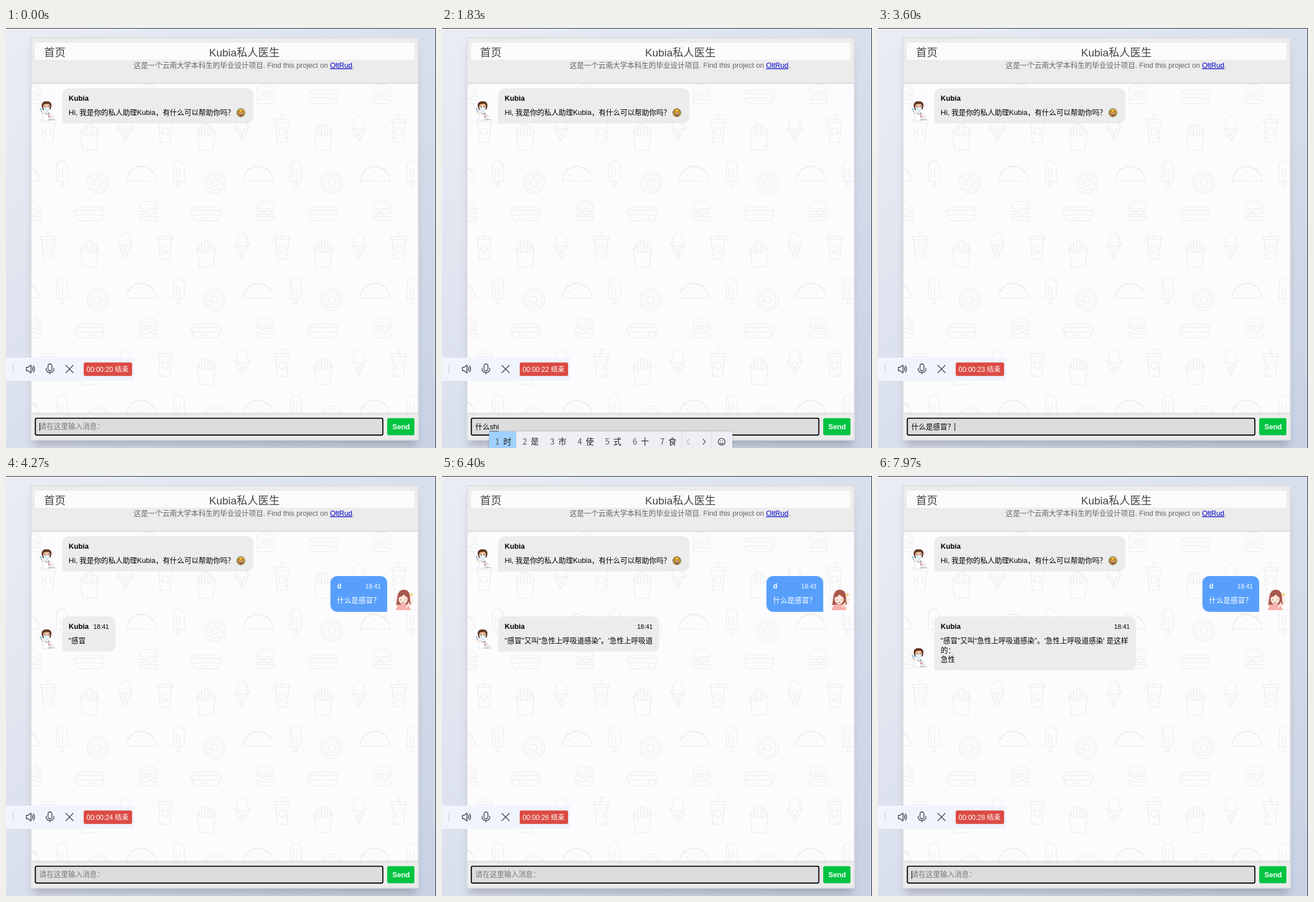
These frames come from a looping animation (758 px wide and 739 px high, 8 s). An HTML page:

```html
<!DOCTYPE html>
<html lang="zh-CN">
<head>
<meta charset="utf-8">
<title>Chat</title>
<style>
html, body { margin: 0; width: 100%; height: 100%; overflow: hidden; }
body { font: 12.7px/16.5px "Liberation Sans", "Noto Sans CJK SC", "Noto Sans CJK", sans-serif; color: #000; }
#stage { position: absolute; left: 0; top: 0; width: 758px; height: 739px; overflow: hidden;
  background: linear-gradient(135deg, #eaedf5, #c8d2e4); }
#stage > * { position: absolute; }
.panel { left: 43px; top: 16px; width: 685px; height: 710px; box-sizing: border-box; border: 2px solid #dcdde0;
  border-radius: 4px; background: #fcfcfe; box-shadow: 0 14px 14px -5px rgba(0, 0, 0, .2); }
.art { left: 0; top: 0; }
.bubble { box-sizing: border-box; padding: 10px 11.5px 10.5px; border-radius: 12px 12px 12px 0; background: #ececec; }
.bubble.me { border-radius: 12px 12px 0 12px; background: #579ffb; color: #fff; }
.head { display: flex; justify-content: space-between; align-items: baseline; height: 16.5px; margin-bottom: 8.5px; }
.head b + span { font-size: 11px; margin-left: 8.2px; }
.msg { max-width: 333.4px; white-space: pre-wrap; }
.msg svg { vertical-align: -4px; margin-left: -1px; }
#input { left: 58.8px; top: 694.4px; white-space: pre; }
#hint { left: 58.8px; top: 693.4px; color: #777; }
#comp { border-bottom: 1px solid #666; }
#caret { display: inline-block; width: 1px; height: 14px; margin-right: -1px; vertical-align: -2.5px; background: #000; }
#ime { top: 710px; height: 34px; display: flex; background: #eeeff5; box-shadow: 0 0 4px rgba(0, 0, 0, .22);
  font: 14.3px/34px "Noto Sans CJK SC", "Noto Sans CJK", sans-serif; color: #222; white-space: nowrap; }
#ime span { padding: 0 9.2px 0 25px; position: relative; }
#ime span:first-child { background: #9fd0ff; }
#ime i { position: absolute; left: 10.5px; font-style: normal; color: #555; }
#ime svg { flex: none; }
</style>
</head>
<body>
<div id="stage">
  <div class="panel"></div>
  <svg class="art" width="758" height="739" fill="none">
    <defs>
      <g id="food" stroke="#ebebef" stroke-width="1.2" stroke-linejoin="round" stroke-linecap="round">
        <path d="M61 367h27v5h-27zM63 372l3 35h17l3-35M74 366v-7h8"/><circle cx="74.5" cy="388" r="6"/>
        <path d="M131 388l4 33h24l4-33q-4 7-16 7t-16-7zM134 390v-8h5v12M139 384v-7h5v17M144 379v-4h6v20M150 378h5v16M155 382h5v9"/>
        <path d="M199 383l11 22 11-22M197 383v-4h4q-2-18 9-18t9 18h4v4zM204 383l9 15M216 383l-9 15"/>
        <path d="M89 476v-24q0-12 9-12t11 12q-3 4 0 8v14q0 2-20 2zM96 476v9h5v-9M94 470v-16M100 470v-16"/>
        <circle cx="162" cy="478" r="19"/><circle cx="162" cy="478" r="6"/>
        <circle cx="162" cy="478" r="14.5" stroke-dasharray="7 3"/><circle cx="162" cy="478" r="10" stroke-dasharray="2 7"/>
        <path d="M212 473q3-20 26-24 23 4 27 24 0 3-3 2h-47q-3 1-3-2zM215 465q4-5 6-11 6 1 9-5 7 2 11-1 6 5 10 4 6 5 9 7M224 466h4M236 460h3M246 467h4M233 470h3"/>
        <path d="M236 318q0-13 15-13t16 13zM235 322h33M235 327q4 4 8 0t8 0 8 0 8 0M236 332h31v3q0 4-4 4h-23q-4 0-4-4zM244 312h2M252 310h2M259 314h2"/>
        <path d="M123 321q1-6 8-6h33q7 0 8 6M123 329q0 10 9 10h30q9 0 9-10M136 334l3-2M146 336l3-2M156 334l3-2"/>
        <rect x="120" y="321" width="54" height="8" rx="4"/>
      </g>
      <g id="nurse">
        <path d="M9 36q-1-14 6-16 9 0 8 16z" fill="#fff" stroke="#d3d7de" stroke-width=".8"/>
        <path d="M9 24l-4-7" stroke="#f3cdb4" stroke-width="2.500"/>
        <path d="M22 25l4 6-6 2" stroke="#e6e8ee" stroke-width="3"/>
        <path d="M4 14l3 5" stroke="#7fc3e8" stroke-width="2.200"/>
        <path d="M7 11q-1-9 8-9t9 8l-1 6-14 1z" fill="#573322"/>
        <ellipse cx="15.500" cy="12" rx="6" ry="7" fill="#f5c4a4"/>
        <path d="M9 8q2-7 8-6 6 0 7 6-7-3-15 0z" fill="#64391f"/>
        <path d="M10 13h11l-2 6q-3.500 1.500-7 0z" fill="#e4f1f8" stroke="#b9d9e8" stroke-width=".6"/>
        <path d="M12 11h1.500M18 11h1.500" stroke="#332" stroke-width="1.4"/>
        <path d="M13 22q3 6 6 0l1 5" stroke="#55606e" stroke-width=".9"/>
        <circle cx="20" cy="29" r="1.500" fill="#d0605a"/><path d="M18 34.500h12" stroke="#999" stroke-width=".9"/>
      </g>
    </defs>
    <path d="M0 .5H757.500V739" stroke="#20222a"/>
    <svg id="wall" x="45" y="98" width="681" height="580" viewBox="45 98 681 580"></svg>
    <path d="M45 18h681v79H45zM45 678h681v46H45z" fill="#ececec"/>
    <path d="M45 97.200h681M45 678.300h681" stroke="#dcdcdd" stroke-width="1.9"/>
    <path d="M51 26h669v30H51z" fill="#fbfbfc"/>
    <g font-size="19" fill="#444"><text x="67" y="50">首页</text><text x="358" y="50">Kubia私人医生</text></g>
    <text x="225" y="70" fill="#666">这是一个云南大学本科生的毕业设计项目. Find this project on <tspan fill="#0000c8" text-decoration="underline">OltRud</tspan>.</text>
    <rect x="51.700" y="686.600" width="612.600" height="29.600" rx="2.500" fill="#ddd" stroke="#000" stroke-width="1.9"/>
    <rect x="672" y="686.500" width="48" height="30" rx="3" fill="#00c441"/>
    <text x="681" y="705.700" fill="#fff" font-weight="bold">Send</text>
    <use href="#nurse" x="56" y="127"/>
    <g id="girl">
      <circle cx="701" cy="219" r="17.500" fill="#fdf0ee"/>
      <path d="M688 227q1-8 2-15 2-12 11-12 10 0 11 12 0 8 2 14z" fill="#a9584c"/>
      <path d="M687 236q1-10 13-11 12 1 13 11z" fill="#f7b0ab"/>
      <ellipse cx="700" cy="217" rx="8" ry="8.500" fill="#ffe6da"/>
      <path d="M691 214q1-10 10-11 8 1 9 11-6-1-9-6-3 5-10 6z" fill="#a9584c"/>
      <path d="M696 217v2M704 217v2M698 222q2 1 4 0" stroke="#7b463d"/>
      <path d="M706 231l5-8" stroke="#ffe3d5" stroke-width="3"/>
      <path d="M715 205l1 3 3 1-3 1-1 3-1-3-3-1 3-1z" fill="#f8cf55"/>
    </g>
    <use id="nurse2" href="#nurse" x="56"/>
  </svg>

  <div class="bubble" style="left:99px;top:106px;width:337px;height:62px">
    <div class="head"><b>Kubia</b></div>
    <div class="msg" style="white-space:nowrap">Hi, 我是你的私人助理Kubia，有什么可以帮助你吗？
      <svg width="16" height="16" viewBox="0 0 16 16" fill="none"><circle cx="8" cy="8" r="7" fill="#f8bd3a" stroke="#43351c"/><path d="M3.500 8.500h9q-.5 4.500-4.500 4.500t-4.500-4.500z" fill="#a3322f" stroke="#43351c" stroke-width=".8"/><path d="M4.300 9h7.400l-.6 1.500h-6.200z" fill="#fff"/><path d="M3.500 6.500q1.500-3 3 0M9.500 6.500q1.500-3 3 0" stroke="#43351c" stroke-width="1.200"/></svg></div>
  </div>
  <div class="bubble me" id="ask" style="left:572px;top:176px;width:100.400px;height:62.500px">
    <div class="head"><b>d</b><span>18:41</span></div>
    <div class="msg" style="white-space:nowrap">什么是感冒？</div>
  </div>
  <div class="bubble" id="reply" style="left:99px;top:247px">
    <div class="head"><b>Kubia</b><span>18:41</span></div>
    <div class="msg" id="answer"></div>
  </div>

  <svg class="art" width="230" height="739" fill="none" stroke="#3d3f46" stroke-width="1.4" stroke-linejoin="round" stroke-linecap="round">
    <path d="M0 580h226v41H0z" fill="#f0f4fd" stroke="none"/>
    <path d="M12.500 592v16" stroke="#c5c9d2" stroke-width="1"/>
    <path d="M36 597h3l5-4v14l-5-4h-3zM46.500 597q2 3 0 6M48.500 594.500q4 5.500 0 11"/>
    <rect x="74" y="591" width="7" height="12" rx="3.500"/><path d="M70.500 599q0 7 7 7t7-7M77.500 606v2.500"/>
    <path d="M105.500 593.500l13 13M118.500 593.500l-13 13"/>
    <rect x="137" y="588.500" width="85.300" height="23.700" rx="3" fill="#db4b44" stroke="none"/>
    <text id="clock" x="142" y="605" font-size="12" fill="#fff" stroke="none"></text>
  </svg>

  <div id="hint">请在这里输入消息：</div>
  <div id="input"><span id="done"></span><span id="comp"></span><span id="caret"></span></div>
  <div id="ime"></div>
</div>
<script>
const LOOP = 8000, BLINK = 537, SENT = 3610;
const $ = id => document.getElementById(id);

// time, committed text, composition, candidates
const keys = [
  [0, '', '', ''],
  [45, '', 's', '是 说 上 所 三 谁 岁'],
  [160, '', 'sh', '是 上 说 时 谁 水 书'],
  [280, '', 'she', '社 设 射 舍 蛇 摄 涉'],
  [400, '', 'shen', '身 深 神 伸 甚 审 慎'],
  [540, '', "shen'm", '什么 神秘 神马 神魔 申明 神庙 深谋'],
  [795, '什么', '', ''],
  [880, '什么', 's', '是 说 上 所 三 谁 岁'],
  [1020, '什么', 'sh', '是 上 说 时 谁 水 书'],
  [1170, '什么', 'shi', '时 是 市 使 式 十 食'],
  [1950, '什么是', '', ''],
  [2100, '什么是', 'g', '个 给 过 高 该 更 国'],
  [2240, '什么是', 'ga', '嘎 噶 尬 尕 旮 咖 伽'],
  [2390, '什么是', 'gan', '干 感 敢 赶 杆 肝 甘'],
  [2600, '什么是', "gan'm", '感冒 干嘛 干吗 赶忙 干妈 干么 敢骂'],
  [2790, '什么是', "gan'ma", '干嘛 干吗 干妈 敢骂 赶马 干马 感冒'],
  [2940, '什么是', "gan'mao", '感冒 干毛 赶猫 肝毛 敢冒 干冒 干猫'],
  [3130, '什么是感冒', '', ''],
  [3300, '什么是感冒？', '', '']
];

// time, characters of the answer shown
const stream = [[3950, 1], [4200, 3], [5190, 12], [6060, 21], [6920, 30], [7400, 33], [7865, 35], [7955, 36], [LOOP, 36]];
const answer = '"感冒"又叫“急性上呼吸道感染”。\'急性上呼吸道感染\' 是这样的：\n急性';

const imeTail = `<svg width="90" height="34" fill="none" stroke="#333" stroke-width="1.2">
  <path d="M.5 0v34M52.500 0v34" stroke="#dcdee5"/><path d="M14 13l-4 5 4 5" stroke="#aaa"/><path d="M38 13l4 5-4 5"/>
  <circle cx="71" cy="18" r="6"/><path d="M68 20q3 3 6 0M69 15.500v1.500M73 15.500v1.500"/></svg>`;

let tiles = '';
for (let x = -1; x < 4; x++)
  for (let y = -1; y < 2; y++) tiles += `<use href="#food" x="${x * 206}" y="${y * 206}"/>`;
$('wall').innerHTML = tiles;

const show = (id, on) => { $(id).style.visibility = on ? 'visible' : 'hidden'; };

function shown(t) {
  const i = stream.findIndex(s => s[0] > t);
  if (i === 0) return 0;
  if (i < 0) return answer.length;
  const [t0, n0] = stream[i - 1], [t1, n1] = stream[i];
  return Math.floor(n0 + (n1 - n0) * (t - t0) / (t1 - t0) + .001);
}

let lastKey;
function drawInput(t) {
  const key = keys.findLast(k => k[0] <= t);
  const [start, done, comp, words] = key;
  const text = t >= SENT ? '' : done;
  $('done').textContent = text;
  $('comp').textContent = comp;
  show('hint', !text && !comp);
  show('caret', Math.floor((t - start) / BLINK) % 2 === 0);
  if (key === lastKey) return;
  lastKey = key;
  show('ime', words);
  if (!words) return;
  $('ime').innerHTML = words.split(' ').map((w, i) => `<span><i>${i + 1}</i>${w}</span>`).join('') + imeTail;
  $('ime').style.left = 58 + $('comp').offsetLeft + 'px';
}

function drawReply(t) {
  const n = shown(t);
  show('reply', n);
  show('nurse2', n);
  $('answer').textContent = answer.slice(0, n).trimEnd();
  $('nurse2').setAttribute('y', 247 + $('reply').offsetHeight - 41);
}

function frame() {
  const t = performance.now() % LOOP;
  drawInput(t);
  drawReply(t);
  show('ask', t >= SENT);
  show('girl', t >= SENT);
  $('clock').textContent = `00:00:${20 + Math.max(0, Math.floor((t - 815) / 1007) + 1)} 结束`;
  requestAnimationFrame(frame);
}
frame();
</script>
</body>
</html>
```
